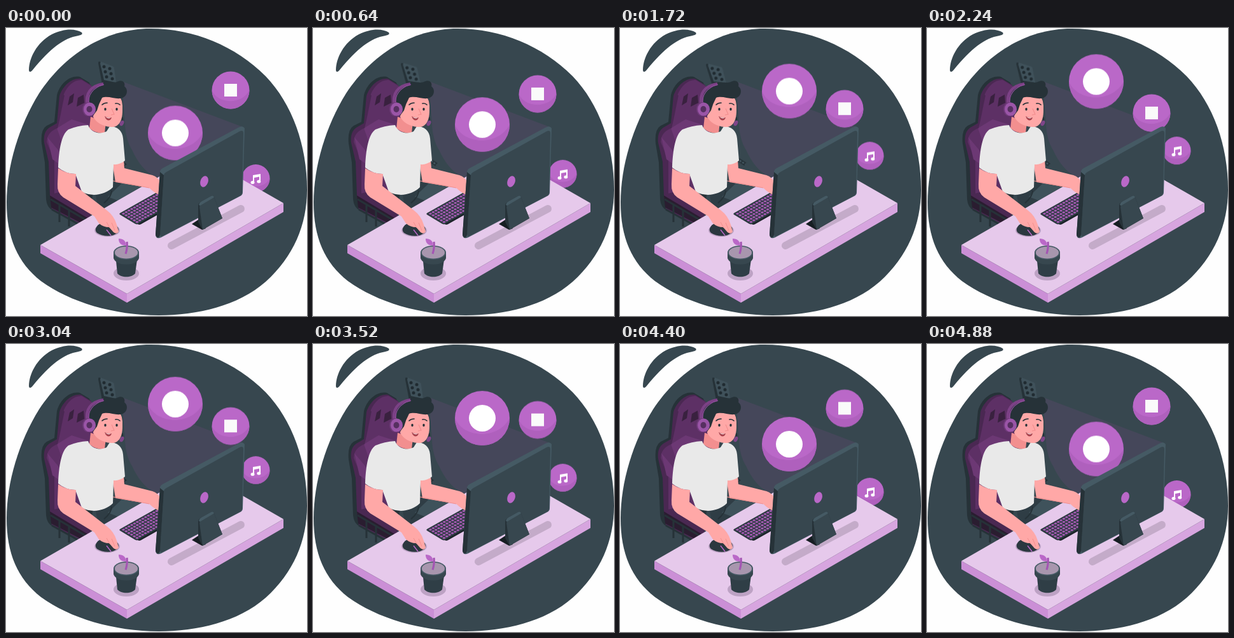
An HTML page that plays this animation: 473x454 px, repeating every 4.92 s.

```html
<!DOCTYPE html>
<html lang="en">
<head>
<meta charset="utf-8">
<title>At the desk</title>
<style>
  html, body { margin: 0; width: 100%; height: 100%; overflow: hidden; background: #fefefe; }
  svg { display: block; width: 473px; height: 454px; }
  .disc { animation: drift 4.92s cubic-bezier(.364, 0, .636, 1) infinite; }
  .big { --from: 165.5px; --to: 83px; }
  .mid { --from: 98px; --to: 134.5px; }
  .small { --from: 237px; --to: 192.5px; }
  @keyframes drift {
    0%, 99.19%, 100% { transform: translateY(var(--from)); }
    49.6% { transform: translateY(var(--to)); }
  }
  .swing { transform-origin: 172px 140px; animation: swing 4.92s infinite; }
  @keyframes swing {
    0% { transform: rotate(0); animation-timing-function: cubic-bezier(.3, .3, .6, 1); }
    28% { transform: rotate(-7.5deg); animation-timing-function: cubic-bezier(.4, 0, .6, 1); }
    60%, 100% { transform: rotate(0); }
  }
</style>
</head>
<body>
<svg viewBox="0 0 473 454">
  <defs>
    <g id="coin">
      <circle r="1" fill="#ba68c8"/>
      <path d="M-1 0C-.7.75.6.8 1 0A1 1 0 0 1-1 0Z" fill="#af60bd"/>
    </g>
  </defs>

  <!-- backdrop -->
  <g fill="#37474f">
    <path d="M227 1C295 1 360 28 408 76C450 120 473 185 473 255C473 310 452 360 408 400C365 438 300 453 240 453C170 453 100 432 55 399C18 370 1 330 1 275C1 218 20 155 52 103C92 42 155 1 227 1Z"/>
    <path d="M36 66C36 48 48 23 72 10C90 1 108 0 119 7C121 10 118 11 114 12C90 16 70 32 42 66C39 70 36 70 36 66Z"/>
  </g>
  <path d="M182 84L372 156L246 228L240 236C222 232 207 212 199 194C191 182 187 165 187 150Z" fill="#45475a"/>

  <g class="swing">
    <path d="M147 53L166 60L172 87L151 88L145 56Q145 52 147 53Z" fill="#263238"/>
    <path d="M149 53L167 60Q170 61 170 64L173 86L154 82L148 56Z" fill="#3f515a"/>
    <g fill="#202b31">
      <circle cx="154" cy="61" r="2.500"/><circle cx="163" cy="64" r="2.500"/>
      <circle cx="156" cy="69" r="2.500"/><circle cx="165" cy="72" r="2.500"/>
      <circle cx="158" cy="77" r="2.500"/><circle cx="167" cy="80" r="2.500"/>
    </g>
    <path d="M172 204L188 217" stroke="#263238" stroke-width="6"/>
    <path d="M172 204L188 217" stroke="#455a64" stroke-width="2.500" stroke-dasharray="3 2"/>
  </g>

  <!-- chair -->
  <path d="M80 106C85 87 101 74 116 77L131 86L150 150L130 312L74 288Q64 283 63 270L61 212L56 182Q54 160 64 154L76 148Z" fill="#263238"/>
  <path d="M84 107C90 90 104 78 118 80L134 90L140 160L112 300L78 280Q69 274 69 264L67 211L60 181Q58 164 68 157L80 150Z" fill="#4a2852"/>
  <path d="M91 104C97 90 108 81 119 82L137 93L142 160L110 292L84 277Q76 270 76 262L76 208L64 180Q64 165 80 158Z" fill="#5d3065"/>
  <path d="M100 108L107 103L105 117L97 122ZM113 110L122 105L123 118L111 124Z" fill="#39213f"/>
  <path d="M80 158L103 144L128 152L90 186ZM65 172L85 196L83 214L73 207Z" fill="#6c3874"/>
  <path d="M91 106C87 124 84 143 80 158" fill="none" stroke="#4a2852" stroke-width="2"/>

  <!-- floating discs -->
  <g class="disc mid">
    <use href="#coin" transform="translate(353) scale(29.5)"/>
    <rect x="343" y="-10" width="20" height="20" fill="#fafafa"/>
  </g>
  <g class="disc small">
    <use href="#coin" transform="translate(392.5) scale(22)"/>
    <g fill="#fff">
      <path d="M388-5L400-7V5H398V-2.500L390-1V7H388Z"/>
      <ellipse cx="387.500" cy="6.500" rx="3" ry="2.500"/><ellipse cx="397.300" cy="5" rx="3" ry="2.500"/>
    </g>
  </g>
  <g class="disc big">
    <use href="#coin" transform="translate(266) scale(43)"/>
    <circle cx="266" r="21" fill="#fff"/>
  </g>

  <!-- legs, armrest -->
  <path d="M140 258L186 236L232 250L190 286L145 284Z" fill="#2f3d45"/>
  <path d="M160 266L184 243L214 249L176 272Z" fill="#3f525b"/>
  <path d="M166 256Q166 266 154 276" fill="none" stroke="#263238" stroke-width="2"/>
  <path d="M70 262L84 259L134 291L128 314L72 286Z" fill="#4a2852"/>
  <path d="M69 264L129 300V313L71 283Z" fill="#2a1d30"/>
  <path d="M70 270L128 304M72 286L126 316M84 277V306M99 287V313" fill="none" stroke="#263238" stroke-width="3"/>

  <!-- desk -->
  <path d="M54 342L302 199L436 276L190 419Z" fill="#e6c9eb"/>
  <path d="M54 342L190 419V433L54 355Z" fill="#cb8fd6"/>
  <path d="M190 419L436 276V290L190 433Z" fill="#d7a5df"/>
  <path d="M260 343L369 285" stroke="#c4abc9" stroke-width="12" stroke-linecap="round"/>

  <!-- keyboard -->
  <g transform="matrix(.871 -.492 .855 .52 177 293)">
    <rect x="2" y="2" width="78" height="34" rx="3" fill="#1b2429"/>
    <rect width="78" height="33" rx="3" fill="#2d3a41"/>
    <path d="M3 4H76M3 9H76M3 14H76M3 19H76M3 24H76M3 29H76" stroke="#a75bb5" stroke-width="3.400" stroke-dasharray="3.500 1.500"/>
  </g>

  <!-- far arm -->
  <path d="M166 206L185 208L186 221L230 232Q239 235 243 243V264Q233 260 225 252L172 243Z" fill="#ffa8a7"/>
  <path d="M168 241L225 252" stroke="#f28f8f" stroke-width="1"/>

  <!-- neck and shirt -->
  <path d="M133 140L157 148L155 166Q142 167 131 158Z" fill="#f28f8f"/>
  <path d="M129 153C132 163 146 169 158 163L163 155C175 155 183 162 184 174L187 209Q178 216 169 215L168 251C156 263 135 267 119 258L109 230Q94 230 82 220C83 192 87 168 98 160Q112 154 129 153Z" fill="#e9e9e9"/>

  <!-- mouse and near arm -->
  <ellipse cx="159" cy="319" rx="20" ry="10" fill="#bda2c4"/>
  <path d="M141 316C144 307 157 303 170 309Q179 314 176 322C168 330 152 329 143 323Q140 320 141 316Z" fill="#2b383f"/>
  <path d="M158 318L165 327" stroke="#ba68c8" stroke-width="1.500"/>
  <path d="M82 221Q95 230 110 230L109 249L158 287Q170 296 174 310L177 321Q174 326 169 322L162 314Q153 314 146 308L139 297L90 267Q80 260 81 246Z" fill="#ffa8a7"/>
  <path d="M158 306L163 315M166 307L171 319" stroke="#f28f8f" stroke-width="1"/>

  <!-- head -->
  <path d="M141 105L176 105Q184 112 183 130C183 148 176 157 165 156C151 155 142 149 137 140Z" fill="#ffa8a7"/>
  <path d="M132 125C128 102 134 91 146 88C156 83 167 88 174 85C183 80 188 86 186 92C193 97 190 108 183 110C174 114 161 106 151 110Q146 119 143 130L137 138Z" fill="#263238"/>
  <g fill="#263238">
    <ellipse cx="156" cy="128" rx="1.700" ry="2.200"/><ellipse cx="174" cy="128" rx="1.700" ry="2.200"/>
  </g>
  <path d="M151 121Q154 118 159 118M172 119Q176 118 179 121" fill="none" stroke="#263238" stroke-width="1.700" stroke-linecap="round"/>
  <path d="M166 127L170 136L165 137" fill="none" stroke="#f28f8f" stroke-width="1.200"/>
  <path d="M155 139Q160 142 166 141Q164 147 159 145Q156 143 155 139Z" fill="#a53f4a"/>
  <path d="M156 140Q160 142 165 141.500Q160 144 156 140Z" fill="#fff"/>

  <!-- headset -->
  <path d="M128 122C124 104 133 91 153 88" fill="none" stroke="#7c4186" stroke-width="4.500"/>
  <path d="M130 121C128 106 136 94 154 89" fill="none" stroke="#9552a2" stroke-width="1.200"/>
  <ellipse cx="129" cy="128" rx="9" ry="11" fill="#6f3a79"/>
  <ellipse cx="131.500" cy="128" rx="9.500" ry="10.500" fill="#9a55a7"/>
  <ellipse cx="131" cy="128" rx="4.500" ry="5" fill="#563060"/>
  <path d="M179 153Q184 150 183 141" fill="none" stroke="#263238" stroke-width="2"/>
  <ellipse cx="182" cy="150" rx="3" ry="4.500" transform="rotate(30 182 150)" fill="#7f4589"/>

  <!-- monitor -->
  <path d="M242 227Q242 223 246 221L365 157Q372 153 375 158L372 259Q372 263 368 265L244 330Q236 334 235 326Z" fill="#455a64"/>
  <path d="M248 233Q248 229 252 227L367 163Q373 160 373 166L371 259Q371 263 367 265L246 328Q242 330 242 324Z" fill="#37474f"/>
  <path d="M242 227L248 232L242 326Q241 331 238 330Q235 329 235 325Z" fill="#263238"/>
  <ellipse cx="311.500" cy="242" rx="6" ry="9" transform="rotate(20 311.500 242)" fill="#ba68c8"/>

  <!-- stand -->
  <path d="M292 309L304 301L314 316L308 318Z" fill="#161e22"/>
  <path d="M302 280Q302 276 306 274L322 265Q326 263 327 267L340 300L309 318L302 306Z" fill="#263238"/>
  <path d="M304 282Q304 279 307 277L323 268L327 267L340 300L309 318Z" fill="#37474f"/>
  <path d="M303 279Q303 276 306 274L322 265Q326 263 327 267L305 280Z" fill="#455a64"/>

  <!-- plant -->
  <ellipse cx="189" cy="387" rx="20" ry="11" fill="#bda2c4"/>
  <path d="M172 358H207L203 387C197 394 181 394 175 387Z" fill="#2f3e46"/>
  <path d="M169 353H209V363C205 376 173 376 169 363Z" fill="#37474f"/>
  <ellipse cx="189" cy="354" rx="20" ry="11" fill="#455a64"/>
  <ellipse cx="189" cy="354" rx="18" ry="9.500" fill="#a896ae"/>
  <path d="M188 356Q191 347 190 337" fill="none" stroke="#a455b3" stroke-width="3.200"/>
  <path d="M189 343Q177 343 177 332Q188 332 189 343Z" fill="#ba68c8"/>
</svg>
</body>
</html>
```
